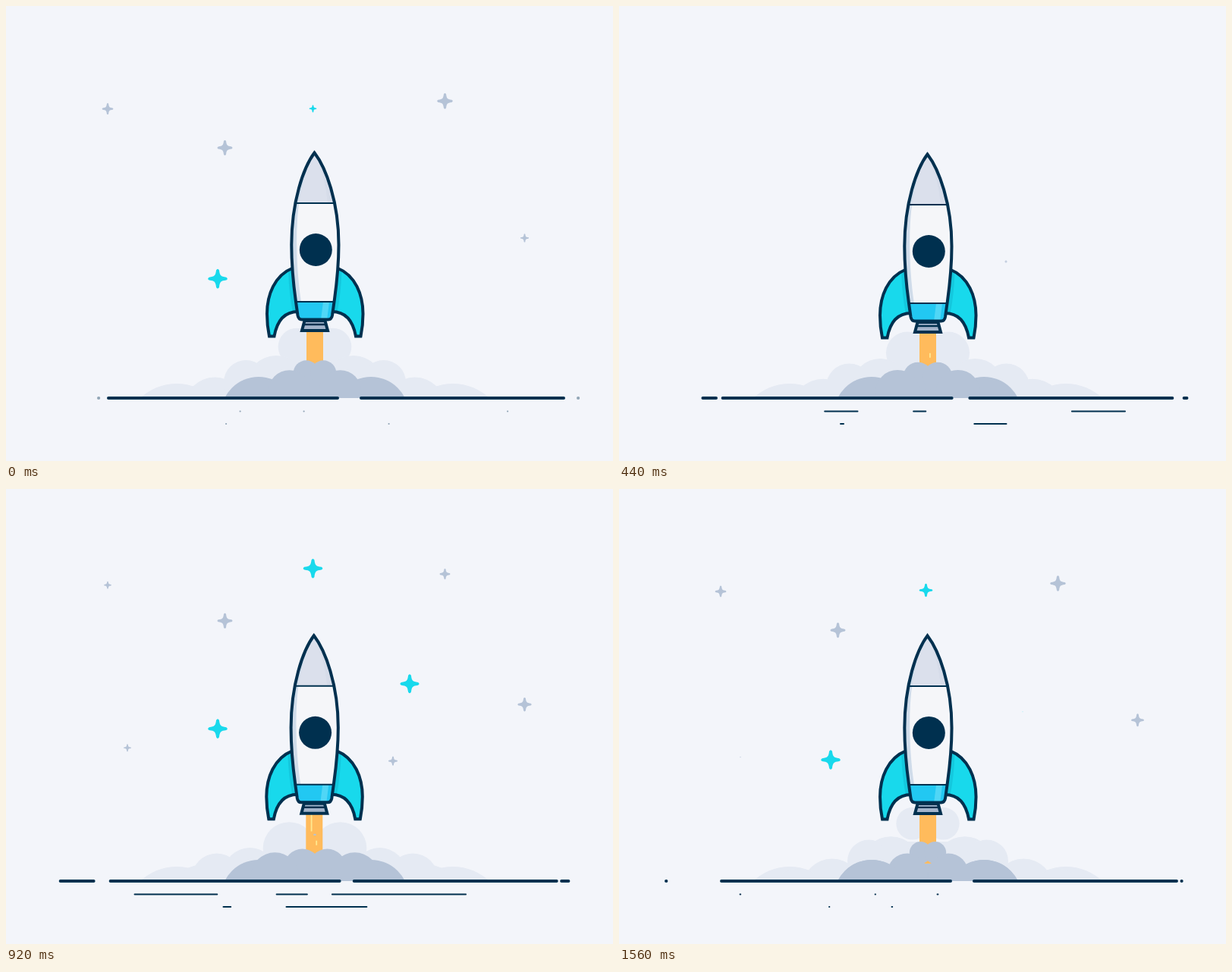
An HTML page with a canvas that plays this animation: 800x600 px, repeating every 1.6 s.

```html
<!DOCTYPE html>
<html lang="en">
<head>
<meta charset="utf-8">
<title>Rocket launch</title>
<style>
  html, body { margin: 0; width: 100%; height: 100%; overflow: hidden; background: #f3f5fa; }
  canvas { display: block; width: 800px; height: 600px; }
</style>
</head>
<body>
<canvas id="stage" width="800" height="600"></canvas>
<script>
const ctx = document.getElementById('stage').getContext('2d');
const LOOP = 1600, STEP = 40, PUFF = 400, MID = 407, GROUND = 517;
const NAVY = '#00304f', CYAN = '#18d9ec', GREY = '#b5c3d7', MIST = '#e5eaf3', SKY = '#f3f5fa';

const span = (v, a, b) => Math.max(0, Math.min(1, (v - a) / (b - a)));
const ease = (v, p) => v < .5 ? (2 * v) ** p / 2 : 1 - (2 - 2 * v) ** p / 2;

// Keys are [time, ...values]; null outside their time range.
function sample(keys, t) {
  const i = keys.findIndex(key => key[0] >= t);
  if (i < 0 || t < keys[0][0]) return null;
  const [t0, ...from] = keys[Math.max(0, i - 1)], [t1, ...to] = keys[i];
  const k = span(t, t0, t1) || 0;
  return from.map((v, j) => v + (to[j] - v) * k);
}

// Life of a puff: age, x, y, radius. A new one follows every PUFF ms.
const mainPuff = [
  [120, 406, 420, 0], [320, 390, 433, 18], [560, 370, 482, 38],
  [800, 356, 500, 39], [960, 310, 511, 34], [1400, 246, 546, 46]
];
const sidePuff = [[560, 358, 480, 26], [720, 342, 485, 27], [960, 265, 519, 34], [1160, 236, 543, 42]];
const frontPuff = [
  [100, 407, 454, 0], [320, 399, 474.5, 12], [560, 389, 504, 27],
  [760, 380, 507, 26.5], [960, 348, 512, 33], [1160, 333, 539, 50]
];
const shake = [[0, 0, 0], [160, 1, 1], [440, 0, 2], [720, 0, -1], [920, -.7, -.2], [1160, .4, -1], [1600, 0, 0]];

// Stars: x, y at birth, birth time, speed in px/s, size, colour
const stars = [
  [134, 126, 867, 13, 7.5, GREY],
  [578.5, 111, 865, 19.5, 10.3, GREY],
  [288.5, 171.6, 802, 19.2, 10, GREY],
  [683.5, 276.2, 670, 32, 9.2, GREY],
  [160, 334.7, 570, 19, 5, GREY],
  [510, 335.8, 413, 45, 6.2, GREY],
  [404.5, 92.1, 640, 45, 12.8, CYAN],
  [279, 308.1, 795, 64, 12.8, CYAN],
  [532, 235.6, 555, 58, 12.6, CYAN]
];

// Dashes: start x, end x, y, sway
const dashes = [
  [122, 62, GROUND, 10], [754, 741.5, GROUND, -10],
  [308.5, 159.5, 534.5, 10], [392.5, 337.5, 534.5, 20], [661, 419.5, 534.5, 10],
  [290, 277, 551, 10], [504.5, 359.5, 551, 10]
];

function line(x1, x2, y, w) {
  ctx.lineCap = 'round';
  ctx.lineWidth = w;
  ctx.strokeStyle = NAVY;
  ctx.beginPath();
  ctx.moveTo(x1, y);
  ctx.lineTo(x2, y);
  ctx.stroke();
}

function disc(x, y, r) {
  ctx.beginPath();
  ctx.arc(x, y, r, 0, 7);
  ctx.fill();
}

function pair(x, y, r) {
  disc(x, y, r);
  disc(2 * MID - x, y, r);
}

function box(color, x, y, w, h) {
  ctx.fillStyle = color;
  ctx.fillRect(x, y, w, h);
}

function shape(color, path, outline) {
  ctx.fillStyle = color;
  ctx.fill(path);
  if (!outline) return;
  ctx.lineWidth = 4;
  ctx.strokeStyle = NAVY;
  ctx.stroke(path);
}

function saved(draw) {
  ctx.save();
  draw();
  ctx.restore();
}

// A cloud: mirrored moving puffs over a fixed mound and solid core
function cloud(color, mound, cores, tracks, t) {
  saved(() => {
    ctx.beginPath();
    ctx.rect(0, 0, 800, GROUND);
    ctx.clip();
    for (const [x, y] of cores) box(color, x, y, 2 * (MID - x), GROUND - y);
    ctx.fillStyle = color;
    pair(...mound);
    for (const track of tracks) {
      for (let age = t % PUFF; age < LOOP; age += PUFF) {
        const puff = sample(track, age);
        if (puff) pair(...puff);
      }
    }
  });
}

const starPath = new Path2D(
  'M-.15-.88Q0-1.12 .15-.88C.23-.3 .3-.23 .88-.15Q1.12 0 .88 .15C.3 .23 .23 .3 .15 .88' +
  'Q0 1.12-.15 .88C-.23 .3-.3 .23-.88 .15Q-1.12 0-.88-.15C-.3-.23-.23-.3-.15-.88Z');

function drawStars(t) {
  const life = 1010, grow = 80, shrink = 130;
  for (const [x, y, birth, speed, size, color] of stars) {
    const age = (t - birth + LOOP) % LOOP;
    const r = size * Math.min(span(age, 0, grow), span(life - age, 0, shrink));
    if (r > 0) saved(() => {
      ctx.translate(x, y + speed * age / 1000);
      ctx.scale(r, r);
      shape(color, starPath);
    });
  }
}

// Each dash runs out head first, then its tail catches up.
function drawGround(t) {
  const u = t / LOOP, sway = Math.sin(Math.PI * u) ** 2;
  const head = ease(span(u, .04, .62), 2.6);
  const tail = ease(span(u, .33, 1), 2);
  line(135 + 2.8 * sway, 437 + 2.8 * sway, GROUND, 4);
  line(468 - 9.8 * sway, 735 - 9.8 * sway, GROUND, 4);
  ctx.globalAlpha = .4 + .6 * span(t, 0, 80);
  for (const [from, to, y, shift] of dashes) {
    const at = k => from + (to - from) * k + shift * sway;
    line(at(head), at(tail) + .2, y, y === GROUND ? 4 : 2);
  }
  ctx.globalAlpha = 1;
}

function drawFlame(t) {
  const streak = '#ffe88f';
  box('#ffbb5c', 396, 425, 22, 69);
  if (t > 560 && t < 1400) box(streak, 402.4, 428, 1.8, 10 + (t - 560) * .038);
  if (t > 120 && t < 1080) {
    const y = 451 + (t - 160) * .017, len = 1 + 5 * span(t, 160, 400);
    box(streak, 409, y, 1.8, len);
    box(streak, 409, y + 20 + 6 * span(t, 400, 720), 1.8, len);
  }
}

const hull = new Path2D(
  'M406.5 193.5C392 213 376.3 258 376.3 315C376.3 348 379.5 372 382 390L384.5 408Q385.5 413.5 390 413.5' +
  'H424.500Q429 413.500 430 408L432.500 390C435 372 438.500 348 438.500 315C438.500 258 421.500 213 406.500 193.500Z'
);
const hullShade = new Path2D('M407 193C392 213 374 258 374 315C374 348 378 372 381 390H389C383 350 381 300 386 260Q392 220 407 193Z');
const noseShade = new Path2D('M407 193Q420 222 424 260H436Q428 220 407 193Z');
const bandShine = new Path2D('M418 390H426L423 414H415Z');
const fin = new Path2D('M378 345.5C354 355 344 381 344 406Q344 421 347 435.5H353.5C357 416 366 403 385 403Z');
const finShade = new Path2D('M378 345L372 348Q373 380 378 404L385 403Z');
const nozzle = new Path2D('M393.5 415H420.5L424 428H390Z');

function drawFin() {
  shape(CYAN, fin);
  shape('#14c8de', finShade);
  ctx.lineWidth = 4;
  ctx.strokeStyle = NAVY;
  ctx.stroke(fin);
}

function drawRocket() {
  drawFin();
  saved(() => {
    ctx.translate(2 * MID + .5, 0);
    ctx.scale(-1, 1);
    drawFin();
  });
  shape('#a3b4cb', nozzle, true);
  line(393, 421, 420, 2.4);
  saved(() => {
    ctx.clip(hull);
    box('#f5f6f9', 370, 190, 75, 230);
    box('#dbe0ec', 370, 190, 75, 70);
    shape('#d0dcea', hullShade);
    shape('#d6dce9', noseShade);
    box('#22c8f2', 370, 390, 75, 26);
    shape('#50d6f6', bandShine);
    for (const y of [260, 390]) line(370, 445, y, 2);
  });
  shape('transparent', hull, true);
  ctx.fillStyle = NAVY;
  disc(408.3, 321.5, 21.5);
}

function render(t) {
  const shaken = draw => saved(() => {
    ctx.translate(...sample(shake, t));
    draw(t);
  });
  box(SKY, 0, 0, 800, 600);
  drawStars(t);
  cloud(MIST, [225, 568, 70], [[262, 503], [330, 485], [370, 465]], [mainPuff, sidePuff], t);
  shaken(drawFlame);
  cloud(GREY, [333, 539, 50], [[333, 500], [380, 494]], [frontPuff], t);
  drawGround(t);
  shaken(drawRocket);
}

const start = performance.now();
function tick() {
  const t = (performance.now() - start) % LOOP;
  render(Math.floor(t / STEP) * STEP);
  requestAnimationFrame(tick);
}
tick();
</script>
</body>
</html>
```
